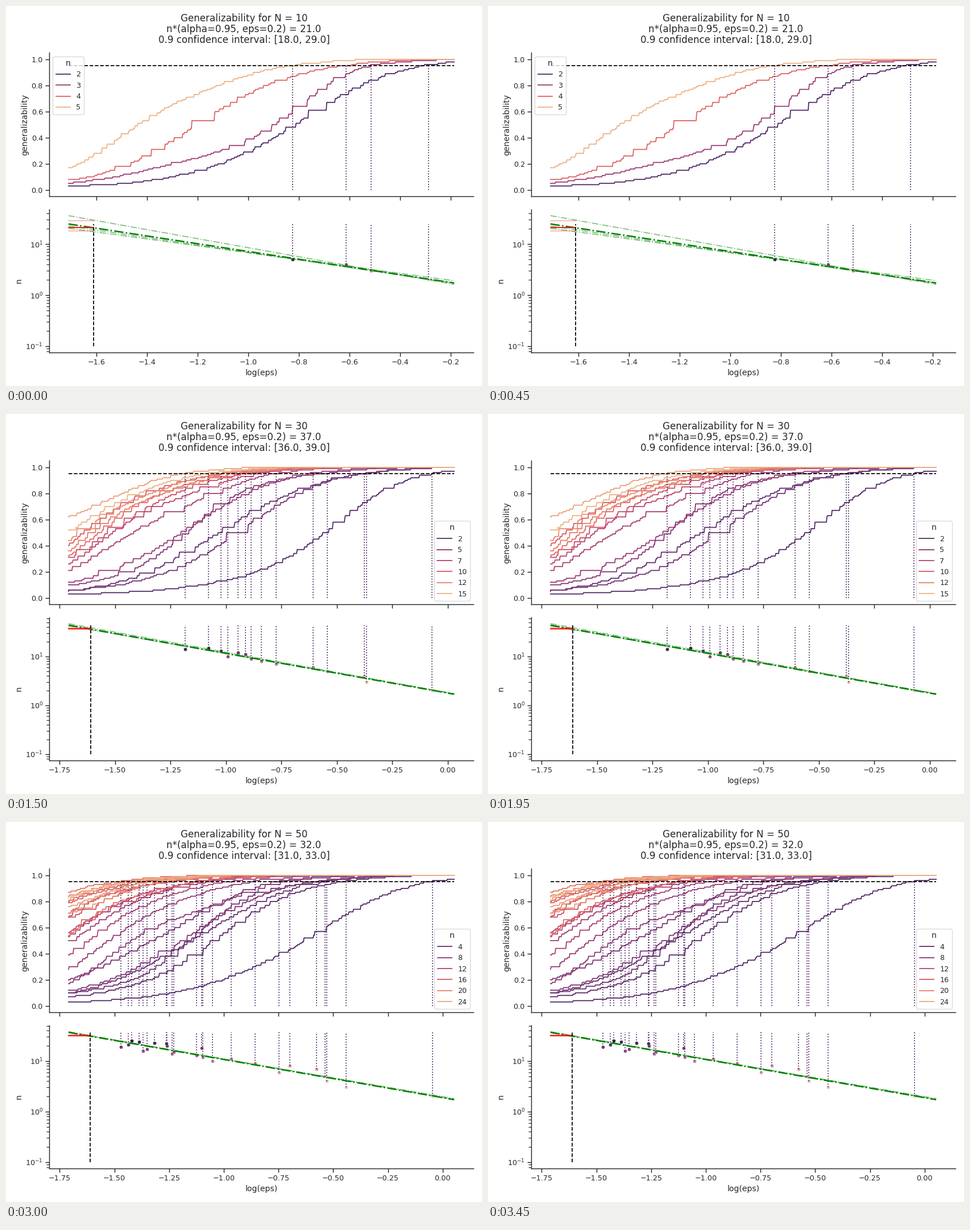
Animation, 837 px wide and 669 px high, one loop 3750 ms. Source, as a matplotlib script:

```python
import numpy as np
import matplotlib.pyplot as plt
from matplotlib.animation import FuncAnimation
from matplotlib.colors import LinearSegmentedColormap
from matplotlib.lines import Line2D
from matplotlib.ticker import MultipleLocator

W, H, DPI = 837, 669, 83.7
LEFT, RIGHT = 110, 788          # stage columns spanned by the data
COLS = np.arange(LEFT, RIGHT + 1)
X_EPS = np.log(0.2)
X_MIN = X_EPS - 0.1
INK = "0.15"
FLARE = LinearSegmentedColormap.from_list("dusk", [
    "#4b2362", "#6c2b6d", "#8f3371", "#b13c6c",
    "#d14a61", "#e3685c", "#e98d6b", "#edb081"])

plt.rcParams.update({
    "font.family": "DejaVu Sans", "font.size": 12,
    "text.color": INK, "axes.labelcolor": INK, "axes.edgecolor": INK,
    "xtick.color": INK, "ytick.color": INK,
    "axes.labelsize": 12, "xtick.labelsize": 11, "ytick.labelsize": 11,
    "legend.fontsize": 11, "legend.title_fontsize": 12,
    "axes.linewidth": 1.25, "lines.linewidth": 1.5,
    "xtick.major.size": 6, "ytick.major.size": 6, "ytick.minor.size": 4,
    "xtick.major.width": 1.25, "ytick.major.width": 1.25,
    "ytick.minor.width": 1,
    "axes.spines.top": False, "axes.spines.right": False,
})

# fit and bands: log10(n) at the left and right data edge
# cross: column where the curve for n = 2, 3, ... reaches 95 %
scenes = [
    dict(star=(21, 18, 29), x_max=-0.187, tick=0.2, key_step=1,
         fit=(1.395, 0.238),
         bands=[(1.558, 0.210), (1.356, 0.238), (1.311, 0.283)],
         cross=[743, 642, 598, 504]),
    dict(star=(23, 21, 25), x_max=-0.127, tick=0.2, key_step=1.5,
         fit=(1.444, 0.337), bands=[(1.457, 0.332), (1.374, 0.417)],
         cross=[745, 712, 634, 618, 471, 537, 424, 387, 380]),
    dict(star=(37, 36, 39), x_max=0.029, tick=0.25, key_step=2.5,
         fit=(1.640, 0.227), bands=[(1.671, 0.238), (1.628, 0.233)],
         cross=[749, 634, 630, 565, 540, 475, 449, 431, 390, 421, 408, 378,
                315, 356]),
    dict(star=(40, 39, 41), x_max=0.111, tick=0.25, key_step=3,
         fit=(1.682, 0.139), bands=[(1.727, 0.062), (1.665, 0.145)],
         cross=[751, 614, 546, 540, 494, 489, 432, 448, 376, 376, 376, 334,
                356, 308, 336, 326, 326, 295, 302]),
    dict(star=(32, 31, 33), x_max=0.053, tick=0.25, key_step=4,
         fit=(1.567, 0.236), bands=[(1.581, 0.236), (1.563, 0.258)],
         cross=[750, 598, 564, 561, 480, 546, 499, 438, 363, 396, 346, 335,
                292, 295, 241, 248, 344, 202, 283, 215, 282, 261, 234, 221]),
]


def helix(t):
    """Dot colour: pale pink at t=0 to near black at t=1."""
    x = 0.85 - 0.7 * t
    a, phi = 0.4 * x * (1 - x), 0.8 * np.pi * x
    c, s = np.cos(phi), np.sin(phi)
    rgb = (-0.14861 * c + 1.78277 * s, -0.29227 * c - 0.90649 * s, 1.97294 * c)
    return tuple(np.clip([x + a * v for v in rgb], 0, 1))


def stairs(cross, seed):
    """Logistic rise through 95 % at cross, bent a little and cut into steps."""
    rng = np.random.default_rng(seed)
    span = cross - LEFT
    t = np.clip((COLS - LEFT) / span, 0, 1)
    bend = span * (0.05 * rng.normal() * np.sin(np.pi * t)
                   + 0.025 * rng.normal() * np.sin(2 * np.pi * t))
    gap = cross - COLS + bend
    y = np.clip(0.02 + 0.99 / (1 + np.exp((gap - 240) / 85)), 0, 1)

    # hold each value over a short random run
    marks = np.r_[0, np.cumsum(1 + rng.exponential(6, COLS.size).astype(int))]
    i = np.arange(COLS.size)
    run = np.searchsorted(marks, i, "right")
    middle = (marks[run - 1] + marks[run]) // 2
    return np.round(y[np.minimum(middle, COLS.size - 1)], 2)


fig = plt.figure(figsize=((W + 0.01) / DPI, (H + 0.01) / DPI), dpi=DPI,
                 facecolor="white")


def panel(bottom):
    return fig.add_axes([76 / W, 1 - bottom / H, 746 / W, 252.8 / H])


top, low = panel(335.2), panel(610.4)
title = fig.suptitle("", y=0.981, fontsize=14.4, linespacing=1.08)


def draw(i):
    s = scenes[i]
    x_max, cross = s["x_max"], s["cross"]
    star, lo, hi = s["star"]
    n_max = len(cross) + 1
    ends = [X_MIN, x_max]

    def to_x(col):
        return X_MIN + (col - LEFT) / (RIGHT - LEFT) * (x_max - X_MIN)

    def tone(n):
        return float(np.clip((n - 2) / (n_max - 2), 0, 1))

    title.set_text(f"Generalizability for N = {10 * (i + 1)}\n"
                   f"n*(alpha=0.95, eps=0.2) = {star:.1f}\n"
                   f"0.9 confidence interval: [{lo:.1f}, {hi:.1f}]")
    for ax in (top, low):
        ax.clear()
    low.set_yscale("log")

    # one curve, marker line and dot per n
    peak = 10 ** s["fit"][0]
    dotted = dict(color=FLARE(0.0), ls=":")
    for n, col in enumerate(cross, 2):
        x = to_x(col)
        top.plot(to_x(COLS), stairs(col, 100 * i + n), color=FLARE(tone(n)))
        top.plot([x, x], [0, 0.95], **dotted)
        low.plot([x, x], [n, peak], **dotted)
        low.scatter([x], [n], s=30, color=[helix(tone(n))],
                    edgecolors="white", linewidths=0.48, zorder=1)
    top.plot(ends, [0.95, 0.95], "k--")

    # fitted lines and the predicted n at eps = 0.2
    for band in s["bands"]:
        low.plot(ends, np.power(10, band), "-.", color="green", alpha=0.5)
    low.plot(ends, np.power(10, s["fit"]), "-.", color="green", lw=2.2)
    for n, alpha in ((star, 1), (lo, 0.3), (hi, 0.3)):
        low.plot([X_MIN, X_EPS], [n, n], color="red", alpha=alpha)
    low.plot([X_EPS, X_EPS], [0.1, peak], "k--")

    crest = s["bands"][0][0]
    margin = 0.05 * (crest + 1)
    top.set(ylim=(-0.05, 1.05), ylabel="generalizability")
    top.yaxis.set_major_locator(MultipleLocator(0.2))
    top.tick_params(labelbottom=False)
    low.set(ylim=(10 ** (-1 - margin), 10 ** (crest + margin)),
            xlabel="log(eps)", ylabel="n")
    pad = 0.05 * (x_max - X_MIN)
    for ax in (top, low):
        ax.xaxis.set_major_locator(MultipleLocator(s["tick"]))
        ax.set_xlim(X_MIN - pad, x_max + pad)

    keys = [k for k in s["key_step"] * np.arange(1, 7) if 2 <= k < n_max + 1]
    top.legend([Line2D([], [], color=FLARE(tone(k))) for k in keys],
               [str(int(k)) for k in keys], title="n",
               loc="upper left" if i == 0 else "lower right")
    return []


anim = FuncAnimation(fig, draw, frames=len(scenes), interval=750, repeat=True)
plt.show()
```
